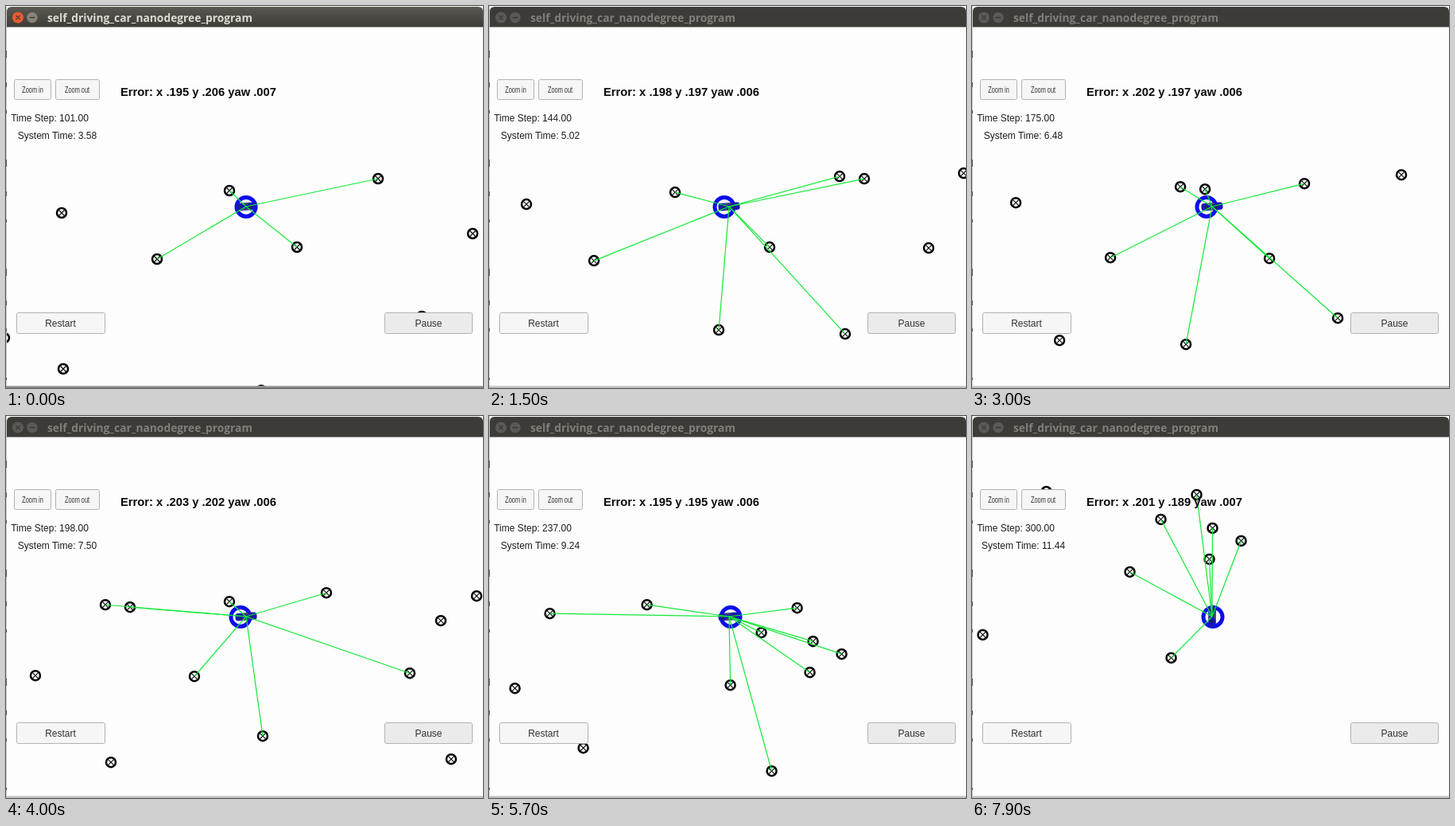
Write an HTML page that moves like this. It is 600 px wide and 480 px high and loops after 8 s.

```html
<!DOCTYPE html>
<html lang="en">
<head>
<meta charset="utf-8">
<title>Localization simulator</title>
<style>
  html, body { margin: 0; width: 100%; height: 100%; overflow: hidden; background: #fdfdfd; }
  svg { display: block; width: 600px; height: 480px; }
  text { font: 12px "Liberation Sans", Arial, sans-serif; fill: #1c1c1c; text-anchor: middle; }
  .error { font-size: 14.75px; font-weight: 700; fill: #0c0c0c; }
  .title { font: 700 13.8px "Open Sans", "Noto Sans", sans-serif; text-anchor: start; fill: #dfdbd2; }
  .narrow text { font-size: 11px; transform: scaleX(.67); }
  .button rect { stroke: #b2b2b2; fill: #f6f6f6; }
  .button text { fill: #303030; }
  #lines { stroke: #14e838; stroke-width: 1.2; }
  .glyph { stroke: #4a3a32; stroke-width: 1.3; fill: none; }
  .close { fill: #ea5a30; }
  .minimise { fill: #85827a; }
  .bar { fill: url(#barShade); }
  .edge { stroke: #8c8a87; stroke-width: 2.4; }
  .blurred .bar { fill: #3c3b37; }
  .blurred .edge { stroke: #c2c0bd; }
  .blurred .close, .blurred .minimise { fill: #5b5955; }
  .blurred .glyph { stroke: #383733; }
  .blurred .title { fill: #827f79; }
</style>
</head>
<body>
<svg viewBox="0 0 600 480">
  <defs>
    <linearGradient id="barShade" x2="0" y2="1">
      <stop offset="0" stop-color="#5a5850"/>
      <stop offset="1" stop-color="#3d3c38"/>
    </linearGradient>
    <clipPath id="view"><path d="M1 26.5H600V477.5H1Z"/></clipPath>
    <g id="mark">
      <circle r="6" fill="#fdfdfd" stroke="#000" stroke-width="2.5"/>
      <path d="M-4-4 4 4M4-4-4 4" stroke="#000" stroke-width="1.1"/>
    </g>
  </defs>

  <rect width="600" height="480" fill="#fdfdfd"/>
  <path d="M.5 0V480" stroke="#cfccc8"/>
  <path d="M.5 56V470" stroke="#555" stroke-dasharray="9 31 6 29 4 58"/>

  <g clip-path="url(#view)">
    <g id="marks"></g>
    <circle id="ring" cy="252.4" r="12" fill="none" stroke="#0c0cee" stroke-width="5"/>
    <g id="car">
      <rect x="-13.5" y="-4.8" width="27" height="9.6" rx="3.5" fill="#1616c0"/>
      <path d="M-8-3V3M6-3V3" stroke="#1d2748" stroke-width="2.6"/>
      <path d="M-5-3.5H3M-5 3.5H3" stroke="#4c5a4c" stroke-width="1.6"/>
    </g>
    <g id="lines"></g>
  </g>

  <g id="window">
    <path class="edge" d="M0 478.8H600"/>
    <path class="bar" d="M1 26.5V7Q1 1 7 1H594Q600 1 600 7V26.5Z"/>
    <circle class="close" cx="15" cy="14.5" r="7"/>
    <circle class="minimise" cx="33" cy="14.5" r="6.7"/>
    <path class="glyph" d="M12.4 11.9l5.2 5.2m0-5.2l-5.2 5.2M29.8 14.5h6.4"/>
    <text class="title" x="52" y="19.5">self_driving_car_nanodegree_program</text>
  </g>

  <g class="button narrow">
    <rect x="10.5" y="92.5" width="46" height="25" rx="2"/>
    <g transform="translate(33.5 109)"><text>Zoom in</text></g>
    <rect x="62.5" y="92.5" width="55" height="25" rx="2"/>
    <g transform="translate(89.5 109)"><text>Zoom out</text></g>
  </g>
  <g class="button">
    <rect x="13.5" y="385.5" width="111" height="26" rx="2"/>
    <text x="68.5" y="403">Restart</text>
    <rect x="476.5" y="385.5" width="110" height="26" rx="2" style="fill:#ebebeb"/>
    <text x="531.5" y="403">Pause</text>
  </g>

  <text id="error" class="error" x="242" y="112.5"></text>
  <text id="step" x="55" y="144.5"></text>
  <text id="clock" x="64.5" y="166.5"></text>
</svg>

<script>
const LOOP = 8000, TICK = 100, BLUR_AT = 1000;
const CAR = { x: 302, y: 252 }, SENSOR_RANGE = 228;

// The road: a straight, a bend to the right, then straight down.
const STRAIGHT = 770.3, RADIUS = 85, START = -0.073, BEND = Math.PI / 2 - START;

// Landmark places, as seen from the start of the road.
const LANDMARKS = [
  [70, 260], [190, 318], [281, 232], [468, 217], [366, 303], [587, 286],
  [523, 390], [72, 456], [-2, 417], [321, 483], [675, 197], [706, 200],
  [831, 193], [787, 287], [682, 395], [953, 182], [873, 362], [1142, 186],
  [1097, 217], [1058, 283], [1110, 391], [1162, 228], [1198, 244], [1158, 267]
];

// Readings along the drive; everything between them is linear.
const READINGS = [
  { t: 0,    gone: 0,     lag: 0,  step: 101, clock: 3.58,  x: 195, y: 206, yaw: 7 },
  { t: 1500, gone: 234.6, lag: 6,  step: 144, clock: 5.02,  x: 198, y: 197, yaw: 6 },
  { t: 3000, gone: 414,   lag: 7,  step: 175, clock: 6.48,  x: 202, y: 197, yaw: 6 },
  { t: 4000, gone: 551.5, lag: 7,  step: 198, clock: 7.5,   x: 203, y: 202, yaw: 6 },
  { t: 5700, gone: 756.4, lag: -2, step: 237, clock: 9.24,  x: 195, y: 195, yaw: 6 },
  { t: 7000, gone: 882.2, lag: 1,  step: 274, clock: 10.5,  x: 199, y: 188, yaw: 6 },
  { t: 7900, gone: 968.5, lag: -1, step: 300, clock: 11.44, x: 201, y: 189, yaw: 7 }
];

const $ = id => document.getElementById(id);

function set(node, attrs) {
  for (const key in attrs) node.setAttribute(key, attrs[key]);
  return node;
}

function make(tag, parent, attrs) {
  const node = document.createElementNS("http://www.w3.org/2000/svg", tag);
  return parent.appendChild(set(node, attrs));
}

function readingAt(t) {
  const i = READINGS.findIndex((r, k) => k > 0 && t <= r.t);
  const a = READINGS[i - 1], b = READINGS[i], u = (t - a.t) / (b.t - a.t);
  const mixed = {};
  for (const key in a) mixed[key] = a[key] + (b[key] - a[key]) * u;
  return mixed;
}

// Place and heading after driving the given distance.
function poseAt(gone) {
  const { sin, cos, min, max } = Math;
  const before = min(gone, STRAIGHT);
  const after = max(0, gone - STRAIGHT - RADIUS * BEND);
  const heading = START + (gone - before - after) / RADIUS;
  return {
    heading,
    x: before * cos(START) + RADIUS * (sin(heading) - sin(START)) + after * cos(heading),
    y: before * sin(START) + RADIUS * (cos(START) - cos(heading)) + after * sin(heading)
  };
}

const landmarks = LANDMARKS.map(([x, y]) => {
  make("use", $("marks"), { href: "#mark", x, y });
  return { x, y, line: make("line", $("lines"), { x1: CAR.x, y1: CAR.y }) };
});

const thousandths = v => "." + String(Math.round(v)).padStart(3, "0");

function draw(t) {
  const now = readingAt(t), pose = poseAt(now.gone);

  set($("marks"), { transform: `translate(${-pose.x} ${-pose.y})` });
  for (const { x, y, line } of landmarks) {
    const x2 = x - pose.x, y2 = y - pose.y;
    const seen = Math.hypot(x2 - CAR.x, y2 - CAR.y) < SENSOR_RANGE;
    set(line, { x2, y2, visibility: seen ? "visible" : "hidden" });
  }

  const degrees = pose.heading * 180 / Math.PI;
  set($("car"), { transform: `translate(${CAR.x} ${CAR.y}) rotate(${degrees})` });
  set($("ring"), { cx: CAR.x - now.lag });

  $("error").textContent =
    `Error: x ${thousandths(now.x)} y ${thousandths(now.y)} yaw ${thousandths(now.yaw)}`;
  $("step").textContent = `Time Step: ${Math.round(now.step)}.00`;
  $("clock").textContent = `System Time: ${now.clock.toFixed(2)}`;
  set($("window"), { class: t < BLUR_AT ? "" : "blurred" });
}

function loop() {
  const t = performance.now() % LOOP;
  draw(Math.floor(t / TICK) * TICK);
  requestAnimationFrame(loop);
}
loop();
</script>
</body>
</html>
```
